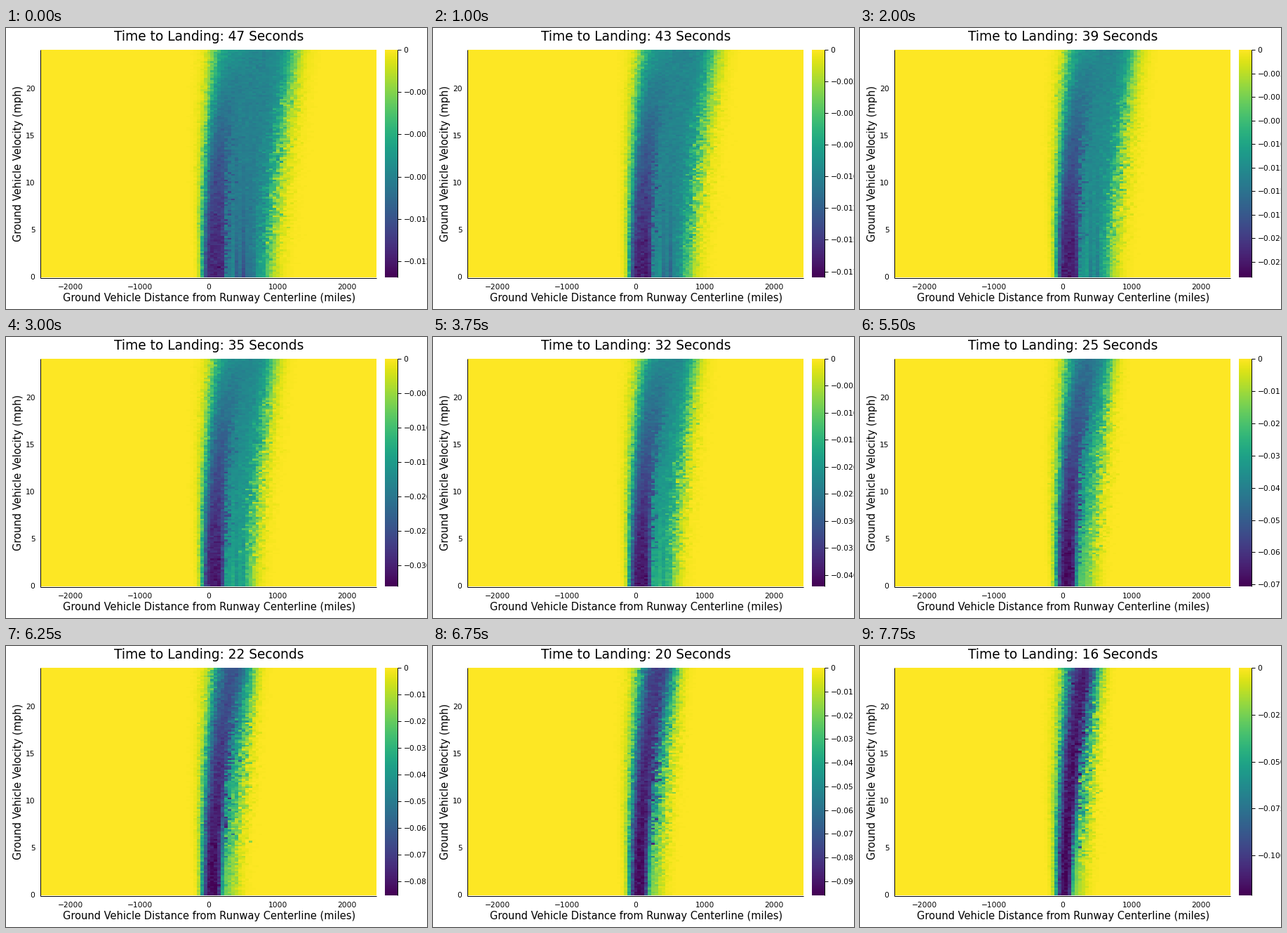
Recreate the animation shown at these times as a matplotlib script. Size 600 px wide and 400 px high, loop 8000 ms.

```python
import numpy as np
import matplotlib.pyplot as plt
from matplotlib.animation import FuncAnimation

WIDTH, HEIGHT, DPI = 600, 400, 100
FRAMES, INTERVAL = 32, 250
START, END = 47, 16
COLS, ROWS = 97, 121
LEFT, RIGHT, TOP, BOTTOM = 50, 528, 31, 355
BAR_LEFT, BAR_RIGHT = 540, 558
X0, Y_SCALE = 289, 13.4
TICK, GUIDE, TITLE = 10.67, 14.67, 18.67


def rise(x, center, width):
    """Smooth step from 0 to 1."""
    return 1 / (1 + np.exp((center - x) / width))


def profile(x, s, seconds):
    """Relative depth at x pixels from the centerline and speed s in 0..1."""
    q = (seconds - END) / (START - END)

    # A deep core fades with speed while there is still time to move away.
    fade = 0.42 * (1 - np.exp(-((seconds - 15) / 8) ** 2))
    core = 1 - 0.1 * q - fade * s ** 1.5
    core_end = 12 + 12 * q ** 0.5 + 30 * s ** (1.5 + 2 * q)

    # The shallower shelf beside it narrows as the landing gets closer.
    shelf = 0.2 + 0.4 * q
    shelf += (0.55 - shelf) * s
    shelf_end = 27 + 55 * q ** 1.2 + (25 + 14 * q) * s ** 1.3

    left = rise(x, -9 + 18 * s ** 2, 2.5 + 4 * s)
    in_core = 1 - rise(x, core_end, 1.5 + 3 * s)
    in_shelf = 1 - rise(x, shelf_end, 5 + 3 * q)
    return left * (core * in_core + shelf * in_shelf * (1 - in_core))


def cost_field(seconds):
    """Relative depth of every cell, 0 to 1, with sampling noise."""
    rng = np.random.default_rng(seconds)
    x = LEFT + (np.arange(COLS) + 0.5) * (RIGHT - LEFT) / COLS - X0
    s = np.linspace(0, 1, ROWS)[:, None]
    right_side = x > 20
    spread = np.where(right_side, 1.2 + 4 * np.sin(np.pi * s ** 0.8), 0.5 + 1.7 * s)
    depth = profile(x + spread * rng.normal(size=(ROWS, COLS)), s, seconds)
    streaks = np.random.default_rng(5).normal(0, 0.13, COLS) * right_side
    grain = rng.normal(0, 0.03, (ROWS, COLS)) + streaks * np.exp(-5 * s)
    return np.clip(depth * (1 + grain), 0, 1)


def max_cost(seconds):
    left = seconds - END
    rate = 0.0645 + 0.0065 * np.tanh((left - 14.3) / 6.6)
    return 0.1213 * np.exp(-rate * left)


def bar_ticks(depth):
    """Tick positions and labels of the color bar."""
    steps = [(0.0025, 4), (0.005, 3), (0.01, 2), (0.025, 3)]
    step, digits = next(s for s in steps if depth / s[0] < 10)
    values = np.arange(int(depth / step) + 1) * step
    labels = ["0"] + [f"\u2212{v:.{digits}f}" for v in values[1:]]
    return TOP + values / depth * (BOTTOM - TOP), labels


plt.rcParams["font.family"] = "DejaVu Sans"
fig = plt.figure(figsize=(WIDTH / DPI, HEIGHT / DPI), dpi=DPI, facecolor="white")
ax = fig.add_axes([0, 0, 1, 1])


def label(x, y, text, px, **style):
    style = {"ha": "center", "va": "baseline", **style}
    return ax.text(x, y, text, fontsize=px * 72 / DPI, color="black", **style)


def line(xs, ys):
    return ax.plot(xs, ys, color="black", lw=0.7, solid_capstyle="butt")[0]


shading = dict(cmap="viridis", vmin=0, vmax=1, aspect="auto",
               interpolation="nearest", origin="lower")
heat = ax.imshow(np.ones((ROWS, COLS)), extent=(LEFT, RIGHT, BOTTOM, TOP), **shading)
ax.imshow(np.linspace(0, 1, 256)[:, None],
          extent=(BAR_LEFT, BAR_RIGHT, BOTTOM, TOP), **shading)
ax.set(xlim=(0, WIDTH), ylim=(HEIGHT, 0))
ax.axis("off")

line([LEFT - 1] * 2, [TOP, BOTTOM + 1])
line([LEFT - 1, RIGHT], [BOTTOM + 1] * 2)
line([BAR_RIGHT] * 2, [TOP, BOTTOM])

for miles in range(-2000, 2001, 1000):
    label(X0 + miles * 0.0985, 371.5, str(miles).replace("-", "\u2212"), TICK)
for mph in range(0, 21, 5):
    label(41.5, BOTTOM - mph * Y_SCALE + 3.4, str(mph), TICK, ha="right")
label(X0 + 0.5, 388.5, "Ground Vehicle Distance from Runway Centerline (miles)", GUIDE)
label(22, 193, "Ground Vehicle Velocity (mph)", GUIDE,
      rotation=90, rotation_mode="anchor")

title = label(X0 + 0.5, 17.5, "", TITLE)
tick_marks = line([], [])
tick_labels = [label(566.4, TOP, "", TICK, ha="left") for _ in range(10)]


def draw(frame):
    seconds = START - frame
    title.set_text(f"Time to Landing: {seconds} Seconds")
    heat.set_data(1 - cost_field(seconds))

    ys, names = bar_ticks(max_cost(seconds))
    gaps = np.full(len(ys), np.nan)
    xs = np.tile([BAR_RIGHT, BAR_RIGHT + 5, np.nan], len(ys))
    tick_marks.set_data(xs, np.c_[ys, ys, gaps].ravel())
    for i, text in enumerate(tick_labels):
        shown = i < len(ys)
        text.set_text(names[i] if shown else "")
        if shown:
            text.set_y(ys[i] + 4)
    return [heat, title, tick_marks, *tick_labels]


anim = FuncAnimation(fig, draw, frames=FRAMES, interval=INTERVAL,
                     repeat=True, repeat_delay=0)
plt.show()
```
